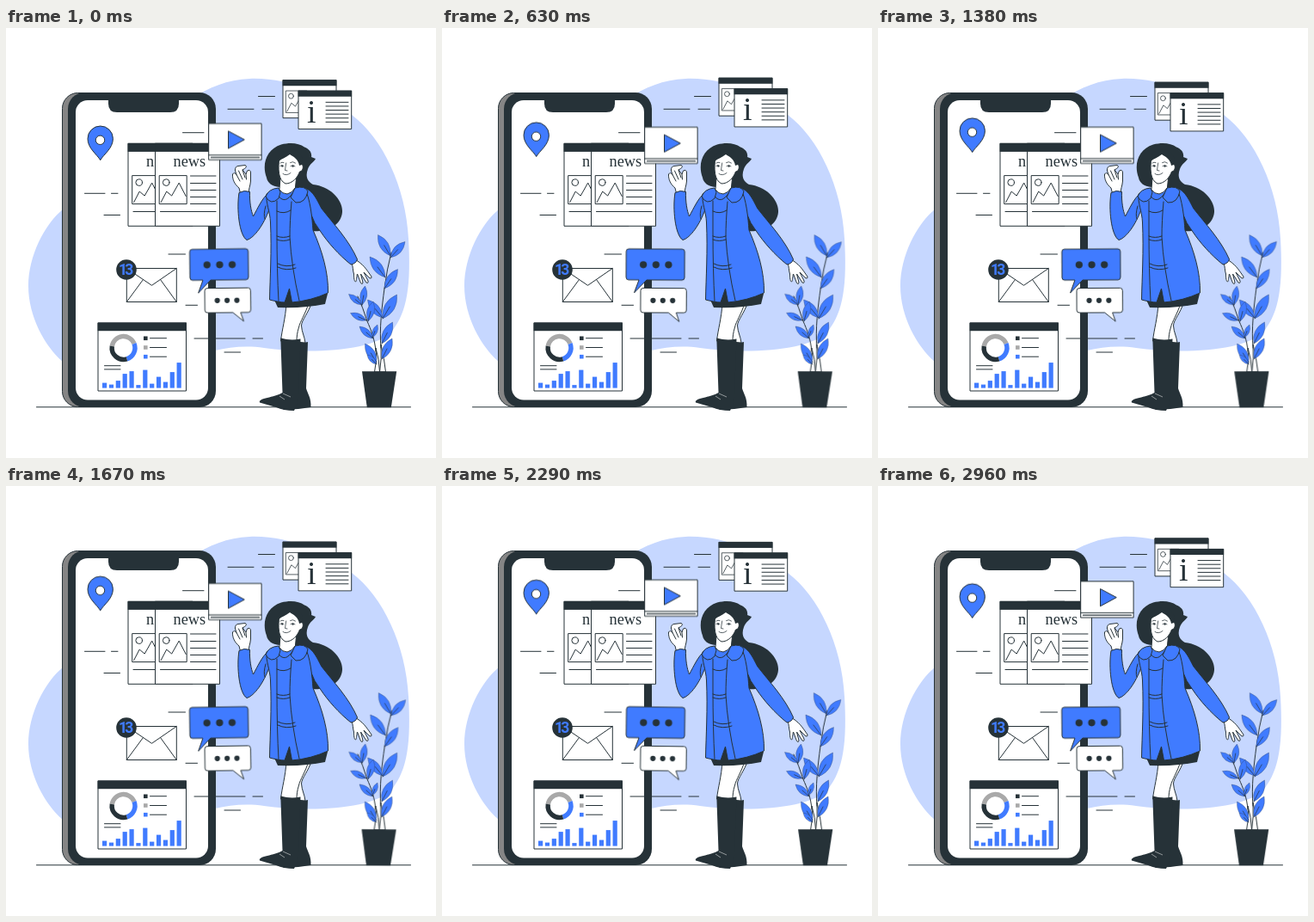
Animation of 500 by 500 pixels, one loop 3000 ms. Source, as an HTML page:

```html
<!DOCTYPE html>
<html lang="en">
<head>
<meta charset="utf-8">
<title>Phone news</title>
<style>
  html, body { margin: 0; width: 100%; height: 100%; overflow: hidden; background: #fff; }
  svg { display: block; width: 100vw; height: 100vh; }
  .ln { fill: none; stroke: #263238; stroke-width: 1; stroke-linecap: round; stroke-linejoin: round; }
  .w { fill: #fff; }
  .b { fill: #407bff; }
  .d { fill: #263238; }
  .g { fill: #a9a9a9; }
  .o { stroke: #263238; stroke-width: 1; stroke-linejoin: round; }
  .serif { font-family: "Liberation Serif", "Times New Roman", serif; fill: #263238; }
  .count { font: 700 17.5px Roboto, "Liberation Sans", sans-serif; letter-spacing: -2.9px; }

  .float { animation: float 1.5s linear infinite alternate; }
  .sway { animation: sway 1.5s linear infinite; transform-box: view-box; }
  #video { animation-delay: -2s; }
  #info { animation-delay: -1s; }
  #chat { animation-delay: -1s; transform-origin: 249px 299px; }
  #plant { transform-origin: 431px 341px; }
  @keyframes float { to { transform: translateY(-10px); } }
  @keyframes sway {
    0%, 100% { transform: rotate(0deg); }
    25% { transform: rotate(1deg); }
    75% { transform: rotate(-1deg); }
  }
</style>
</head>
<body>
<svg viewBox="0 0 500 500">
  <defs>
    <g id="thumb">
      <rect class="w o" width="32" height="33"/>
      <circle class="ln" cx="8" cy="8" r="3.8"/>
      <path class="ln" d="M2 31L8.500 18.500L14.500 23.500L23 8.500L31 24"/>
    </g>
    <g id="page">
      <rect class="w o" width="75" height="96"/>
      <rect class="d" x="-.4" y="-.4" width="75.800" height="10"/>
      <text class="serif" x="21" y="26.500" font-size="18.3">news</text>
      <use href="#thumb" x="4.700" y="37.300"/>
      <path class="ln" d="M41 37.700H70.500M41 46.200H70.500M41 54.200H70.500M41 62.200H70.500M41 70.200H70.500M6 79.200H70.500"/>
    </g>
  </defs>

  <path fill="#c6d7ff" d="M283 59C330 57 372 79 402 101C438 128 465 185 468 245C471 297 467 330 449 352C428 377 350 379 300 372C280 369 260 371 243 375L150 420L66 388C45 370 26 335 26 300C26 265 45 228 66 211L100 150L215 83C235 69 258 60 283 59Z"/>
  <path class="ln" d="M35.500 440.800H470.500"/>

  <g id="phone">
    <rect x="65.500" y="75.500" width="172" height="365" rx="18" fill="#858585" class="o"/>
    <rect class="d" x="72" y="75" width="172" height="366" rx="19"/>
    <rect class="w" x="81" y="84" width="154" height="348.500" rx="14"/>
    <path class="d" d="M119 83H201V88Q201 98 191 98H129Q119 98 119 88Z"/>
  </g>

  <path class="ln" d="M91.500 192.300H115M122.500 192.300H130M114 217.500H132.500M189 263H208.500M205.500 121.700H230M209 322.300H222.500M219 361H278M287 361H298.500M254 377H272.500M293.500 79.500H312.500M258 94.300H288M298 94.300H311.500"/>

  <g id="pin" class="float">
    <path class="b o" d="M109.700 153.700C106 147 95 140 95 128.700A14.700 14.700 0 0 1 124.400 128.700C124.400 140 113.400 147 109.700 153.700Z"/>
    <circle class="w o" cx="109.500" cy="130.300" r="5.200"/>
  </g>

  <use href="#page" x="142" y="134.300"/>
  <use href="#page" x="173.500" y="134.300"/>

  <g id="mail">
    <rect class="w o" x="140.300" y="279.500" width="58" height="39"/>
    <path class="ln" d="M140.300 279.500L169.500 299.300L198.300 279.500M140.300 318.500L159.500 292.500M198.300 318.500L179.500 292.500"/>
    <circle class="d" cx="140" cy="281" r="11.800"/>
    <text class="b count" x="131" y="287.300">13</text>
  </g>

  <g id="chart">
    <rect class="w o" x="107" y="343" width="102.500" height="79"/>
    <rect class="d" x="106.600" y="342.500" width="103.300" height="9.700"/>
    <g fill="none" stroke-width="5.400">
      <path stroke="#a9a9a9" d="M123.300 370A13.400 13.400 0 0 1 149 367"/>
      <path stroke="#407bff" d="M149 367A13.400 13.400 0 0 1 140.500 384.800"/>
      <path stroke="#263238" d="M140.500 384.800A13.400 13.400 0 0 1 123.300 370"/>
    </g>
    <rect class="d" x="160" y="358.500" width="4.600" height="4.600"/>
    <rect class="g" x="160" y="369.200" width="4.600" height="4.600"/>
    <rect class="b" x="160" y="379.900" width="4.600" height="4.600"/>
    <path class="ln" d="M167.500 360.700H186.500M167.500 371.500H186.500M167.500 382.200H186.500M114.500 392.700H133M114.500 396.900H133"/>
    <g id="bars" class="b"></g>
  </g>

  <g id="chat" class="sway">
    <path class="b o" d="M217 257H279Q282 257 282 260V290Q282 293 279 293H238L223.500 308L229 293H217Q214 293 214 290V260Q214 257 217 257Z"/>
    <g class="d">
      <circle cx="234" cy="275.300" r="4.100"/><circle cx="248.700" cy="275.300" r="4.100"/><circle cx="263.300" cy="275.300" r="4.100"/>
    </g>
    <path class="w o" d="M234 302.500H281.300Q284.300 302.500 284.300 305.500V328Q284.300 331 281.300 331H272.500L276 341.300L263.500 331H234Q231 331 231 328V305.500Q231 302.500 234 302.500Z"/>
    <g class="d">
      <circle cx="245.500" cy="316.800" r="3.100"/><circle cx="256.900" cy="316.800" r="3.100"/><circle cx="268.300" cy="316.800" r="3.100"/>
    </g>
  </g>

  <g id="info" class="float">
    <rect class="w o" x="322" y="67.300" width="62" height="44"/>
    <rect class="d" x="321.600" y="66.900" width="62.800" height="7"/>
    <use href="#thumb" transform="translate(325.300 79.700) scale(.77)"/>
    <rect class="w o" x="340" y="79.800" width="61.700" height="44.300"/>
    <rect class="d" x="339.600" y="79.400" width="62.500" height="7"/>
    <text class="serif" x="350" y="116.300" font-size="38">i</text>
    <path class="ln" d="M372 93H398M372 97.600H398M372 102.200H398M372 106.800H398M372 111.400H398M372 116H398"/>
  </g>

  <g id="video" class="float">
    <rect class="w o" x="235.700" y="117.800" width="61.400" height="42.200"/>
    <path class="b o" d="M258.500 126.500L277.300 136.500L258.500 146.700Z"/>
    <path class="ln" d="M235.700 154.300H297"/>
    <path class="ln" style="stroke-width:1.300" d="M238.500 157.200H294.500"/>
  </g>

  <g id="woman">
    <!-- hair -->
    <path class="d" d="M303 174C297 158 303 141 320 135.500C331 132.500 341 134 347 138.500C353 141 356 145 355 150L360 152C358 156 353 158 351 164C348 172 350 178 357 182C377 184 392 200 391 214C390 229 374 238 354 236L335 196L318 185C309 184 304 180 303 174Z"/>
    <!-- legs and boots -->
    <path class="w o" d="M340 320H355C352 331 344 339 343.500 346C344 354 347 358 348 366H337Z"/>
    <path class="w o" d="M326 320H352C348 333 342 341 340.500 348C338.500 354 338 360 338 364H319.500C321 350 325 338 326 320Z"/>
    <path class="d" d="M338 363Q345 367 351 365L349 419C351 426 355 430 354.500 441L340 443L322 444L338 425Z"/>
    <path class="d" d="M319.300 360.500Q331 364 342.500 361.500L340 425C341 434 337 441 335 445Q323 445 314 441L295 435.500C293 430 312 430 321.500 424Z"/>
    <path fill="none" stroke="#fff" stroke-width=".5" d="M318 428L324 432M322 425L331 429"/>
    <path class="d" d="M311 314L316 325Q348 326 371 321L374 309L329 300Z"/>
    <!-- neck -->
    <path class="w o" d="M319 174L318 187L314 196Q325 206 336 190L338 170Z"/>
    <!-- far arm and hand -->
    <path class="w o" d="M401.500 272C404 278 403 282 404.500 286C404.500 291 405 295 406.500 295C408 294 407.500 289 408.500 286L412.500 296.500Q414.500 299 415 296L412.500 286L419 296Q421.500 297.500 421 294L416 284L423 291Q425.500 291.500 425 289C421 284 418 277 407.500 270Z"/>
    <path class="b o" d="M344 186C356 186 361 199 367 210C381 228 399 247 408.500 269Q407 274 401 275C387 264 374 249 366 237Q358 227 354 215Z"/>
    <!-- raised hand and arm -->
    <path class="w o" d="M272.500 192L271 186C266 182 263 176 263.500 170Q265.500 167 268 170.500L266.500 166Q266 161 270 160.500L278 159.500Q281 161 277.500 163.500L275 165L279 170L280.500 166Q284 164 284.500 168L284.500 178C284 184 282 187 282.500 191Z"/>
    <path class="ln" d="M268 170.500L272 178M270.500 166L275 176M275 165L278 174M279 170L279.500 176"/>
    <path class="b o" d="M271 191.500Q277 188 283.500 190.500C283 202 285 213 287.500 219C293 209 297 200 303 194L306 211C300 228 289 244 280 246.500C271 241 268 210 271 191.500Z"/>
    <!-- coat -->
    <path class="b o" d="M317 187L303 193C302 204 307 213 307.500 226C309 260 307 290 306.500 316Q318 319 324 319L329.500 303L332.500 319Q355 317 374.500 308C375 285 368 260 357 235C356 222 354 198 347 186L337 185Q327 200 317 187Z"/>
    <path class="ln" d="M316 194Q324 207 334 191M315 201L315 235Q315 282 317 318M332 202Q330 225 330 243Q332 278 341 317M315 213Q323 217 331 212M315 242Q322 245 330 242M315 246Q322 249 330 246M316 274Q326 279 336 275M316 278Q326 283 337 279"/>
    <path class="b o" d="M317 186Q305 187 302 196Q308 207 317 198L319 191Z"/>
    <path class="b o" d="M336 186Q348 183 351 190Q348 204 337 203L331 197Z"/>
    <path class="ln" d="M302 207Q299 217 301 222"/>
    <!-- face -->
    <path class="w o" d="M318 150C316 164 316.500 177 325 181C333 181 339 174 341.500 167C346 167 347 158 342 157C341 150 337 146 331 145.500C325 146 320 147 318 150Z"/>
    <path class="d" d="M315 158C314 147 322 141 331 141C341 141 347 150 344 159L341 160C340 153 335 150 330 147C325 151 320 152 317.500 155Z"/>
    <path class="ln" style="stroke-width:.75" d="M325.700 157Q325 162 324.500 165.500L327 166M322 169.500Q326 172.500 331 168.500M319 157Q321 155.500 323 156.500M330.500 156.500Q333.500 154.500 336.500 157M318.800 160.300Q321 158.500 323 160.500M331 160.500Q333.500 158.500 336 160.700"/>
    <g class="d"><circle cx="321.200" cy="160.600" r="1.100"/><circle cx="333.600" cy="160.700" r="1.100"/></g>
  </g>

  <g id="plant" class="sway">
    <path class="w o" d="M428.500 400Q432 385 430 372Q434 385 434.500 400Q437 385 436 368Q440 385 441.500 400Z"/>
    <path class="ln" d="M436 372C434 350 437 325 440 303Q443 280 448 261M430 376C429 362 424 350 420 341Q415 325 409 312"/>
    <g id="leaves"></g>
    <path class="d" d="M414 399.300H454.200L447.800 441.200H419.800Z"/>
  </g>
</svg>
<script>
  const fill = (id, markup) => document.getElementById(id).innerHTML = markup;

  const heights = [6, 4, 8.5, 16.5, 19.5, 3.5, 21, 5, 13, 7, 18.5, 29.5];
  fill('bars', heights.map((h, i) =>
    `<rect x="${112 + i * 7.87}" y="${418.6 - h}" width="5.2" height="${h}"/>`).join(''));

  // base x, base y, tip x, tip y
  const leaves = [
    [447, 265, 432.5, 240.5], [447, 267, 464, 248.5],
    [441, 290, 423, 266], [440, 303, 455.5, 280.5],
    [438, 337, 420.5, 316], [438, 338, 454.5, 310],
    [437, 367, 449.5, 342], [437, 385, 449, 361],
    [414, 322, 398.5, 309.5], [414, 322, 417.5, 300],
    [419, 340, 400.5, 331.5], [421, 341, 427, 318],
    [427, 361, 411, 347], [426, 360, 432, 345],
    [431, 389, 417.5, 367], [431, 391, 420, 380]
  ];
  const leaf = ([bx, by, tx, ty]) => {
    const mx = (bx + tx) / 2, my = (by + ty) / 2;
    const nx = (ty - by) * .36, ny = (bx - tx) * .36;
    const side = s => `${mx + s * nx} ${my + s * ny}`;
    return `<path class="b" stroke="#263238" stroke-width=".3"
      d="M${bx} ${by}Q${side(1)} ${tx} ${ty}Q${side(-1)} ${bx} ${by}Z"/>
      <path class="ln" style="stroke-width:.7" d="M${bx} ${by}L${mx} ${my}"/>`;
  };
  fill('leaves', leaves.map(leaf).join(''));
</script>
</body>
</html>
```
